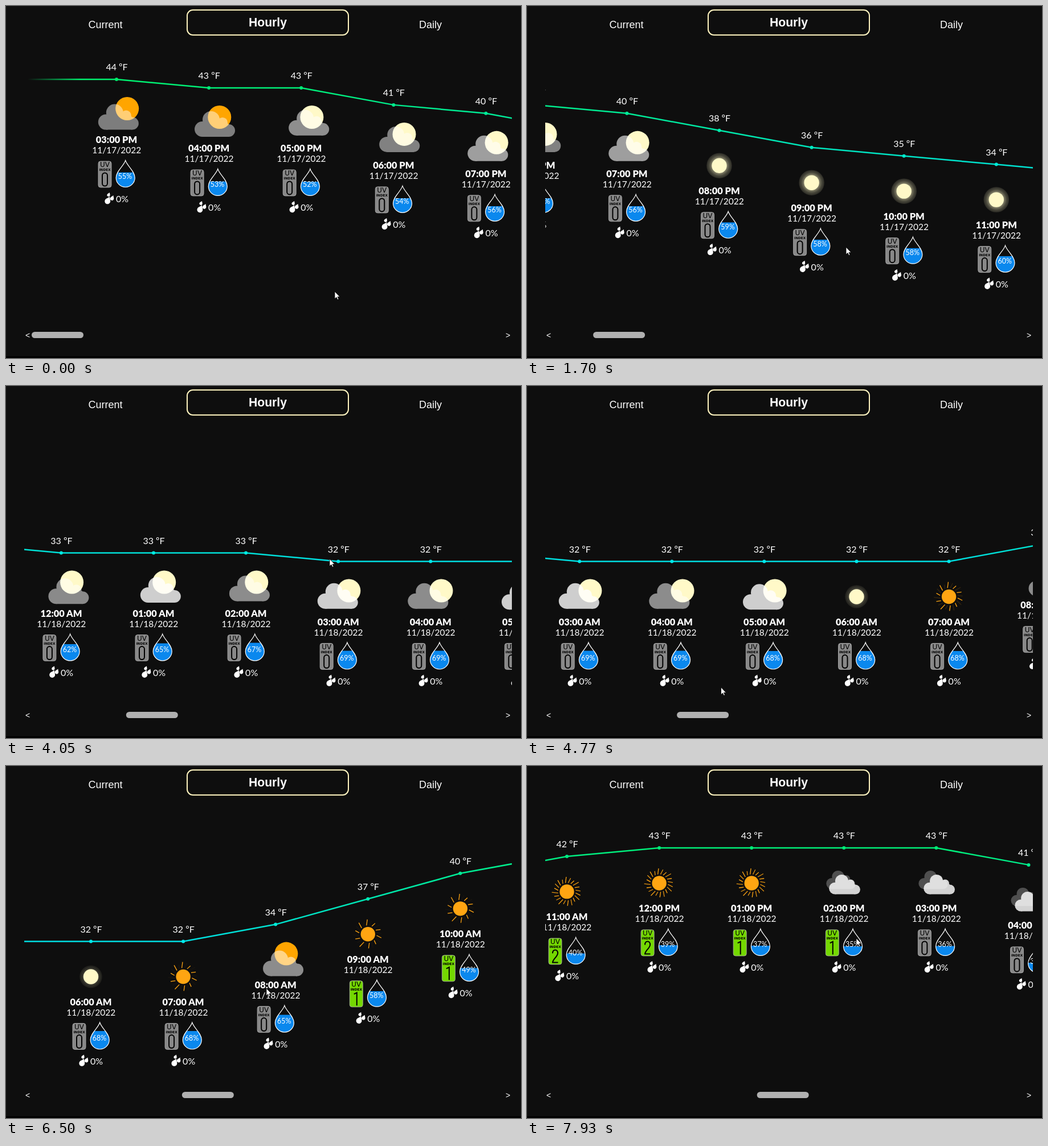
An HTML page that plays this animation: 904x619 px, repeating every 8 s.

```html
<!DOCTYPE html>
<html lang="en">
<head>
<meta charset="utf-8">
<title>Hourly forecast</title>
<style>
html, body { margin: 0; width: 100%; height: 100%; overflow: hidden; background: #0e0e0e; }
svg { display: block; width: 904px; height: 619px; }
text { fill: #fff; font: 16px Lato, sans-serif; text-anchor: middle; }
.tab { font: 18px "Liberation Sans", Arial, sans-serif; }
.tab.on { font-size: 21.2px; font-weight: bold; }
.arrow { font: 14px "Liberation Sans", Arial, sans-serif; }
.time { font-size: 16.4px; font-weight: 900; }
.date { font-size: 15.5px; }
.hum { font-size: 12.5px; }
.start { text-anchor: start; }
.uv { font: 12px "DejaVu Sans", sans-serif; fill: #000; }
.index { font: bold 5.8px "DejaVu Sans", sans-serif; fill: #000; }
.digit { fill: none; stroke: #000; stroke-width: 2; }
</style>
</head>
<body>
<svg viewBox="0 0 904 619">
  <defs>
    <clipPath id="panel"><rect x="32" y="90" width="856" height="480"/></clipPath>
    <linearGradient id="heat" gradientUnits="userSpaceOnUse" x1="0" y1="129" x2="0" y2="309">
      <stop stop-color="#00f06e"/><stop offset="1" stop-color="#00dee2"/>
    </linearGradient>
    <linearGradient id="lead" gradientUnits="userSpaceOnUse" x1="38" y1="0" x2="130" y2="0">
      <stop stop-color="#00f06e" stop-opacity="0"/><stop offset="1" stop-color="#00f06e"/>
    </linearGradient>
    <radialGradient id="glow">
      <stop offset=".55" stop-color="#fff9c8" stop-opacity=".55"/>
      <stop offset=".8" stop-color="#fff9c8" stop-opacity=".25"/>
      <stop offset="1" stop-color="#fff9c8" stop-opacity=".12"/>
    </radialGradient>
    <g id="cloud" fill="#fff">
      <circle cx="13.5" cy="31.5" r="13.5"/><circle cx="29" cy="15" r="15"/>
      <circle cx="49" cy="20" r="9"/><circle cx="60" cy="34" r="11"/>
      <path d="M13.5 45H60V23L49 15H29L18 22Z"/>
    </g>
    <path id="drop" d="M0 0C3 10 16.500 19 16.500 30.500A16.500 16.500 0 0 1-16.500 30.500C-16.500 19-3 10 0 0Z"/>
    <clipPath id="inDrop"><use href="#drop"/></clipPath>
    <g id="rain" fill="#fff">
      <use href="#drop" transform="translate(-12 -11) rotate(24) scale(.16)"/>
      <use href="#drop" transform="translate(-12 -4) rotate(24) scale(.3)"/>
      <use href="#drop" transform="translate(-5.500 -6) rotate(24) scale(.2)"/>
    </g>
  </defs>
  <rect width="904" height="619" fill="#0e0e0e"/>
  <rect y="616" width="904" height="3" fill="#000"/>
  <rect x="318" y="7" width="283" height="44" rx="10" fill="none" stroke="#fff5c0" stroke-width="2"/>
  <text class="tab" x="174.500" y="39">Current</text>
  <text class="tab on" x="459.500" y="36">Hourly</text>
  <text class="tab" x="745" y="39">Daily</text>
  <g clip-path="url(#panel)"><g id="strip"></g></g>
  <text class="arrow" x="38" y="584">&lt;</text>
  <text class="arrow" x="881" y="584">&gt;</text>
  <rect id="thumb" x="45" y="573" width="91" height="11" rx="5.500" fill="#b0b0b0"/>
  <path id="cursor" d="M0 0V13L3 10.200 5 14.500 7 13.600 5 9.400H9Z" fill="#fff" stroke="#000" stroke-width=".8"/>
</svg>
<script>
const $ = id => document.getElementById(id);
const LOOP = 8000, TICK = 130, HOURS = 26, GAP = 162.1;

// Turning points, joined by straight lines: hour and value
const tempTurns = [[0, 44], [2, 43.4], [6, 36.8], [9, 33.5], [16, 32.03], [19, 40.5], [21, 43.9], [24, 43], [25, 41]];
const humidTurns = [[0, 55], [2, 52], [5, 59], [7, 58], [12, 69.9], [16, 68], [17, 65.5], [18, 58], [20, 40.9], [23, 35.9], [25, 37]];

// Time and scroll distance; time and pointer position
const scrollTurns = [[0, 0], [520, 104], [780, 385], [1040, 385], [1690, 667], [2860, 667], [3120, 1001],
  [4030, 1556], [4680, 2047], [5200, 2047], [5590, 2352], [5850, 2150], [6500, 2476.5], [7930, 3366]];
const pointerTurns = [[0, 577, 502], [910, 560, 424], [1950, 560, 424], [2600, 568, 304], [4160, 568, 304],
  [4940, 295, 575], [5590, 326, 566], [6500, 457, 391], [7930, 578, 303]];

function sample(turns, t, c = 1) {
  const n = turns.findIndex(k => k[0] > t);
  if (n < 0) return turns[turns.length - 1][c];
  const a = turns[n - 1], b = turns[n];
  return a[c] + (b[c] - a[c]) * (t - a[0]) / (b[0] - a[0]);
}

const temp = i => Math.floor(sample(tempTurns, i));
const humidity = i => Math.floor(sample(humidTurns, i));
const uvIndex = h => Math.max(0, Math.round(2.2 - .6 * Math.abs(h - 11.5)));
const colX = i => 194 + GAP * i;
const lineY = i => 129 + 14.96 * (44 - temp(i));

const put = (g, html) => g.insertAdjacentHTML('beforeend', html);
const text = (cls, x, y, s) => `<text class="${cls}" x="${x}" y="${y}">${s}</text>`;
const disc = (x, y, r, fill) => `<circle cx="${x}" cy="${y}" r="${r}" fill="${fill}"/>`;
const cloud = (x, y, size, alpha) =>
  `<use href="#cloud" transform="translate(${x} ${y}) scale(${size})" opacity="${alpha}"/>`;

const digits = [
  '<rect x="-4.500" y="150" width="9" height="23" rx="4.500"/>',
  '<path d="M-4 153L1 150.500V173"/>',
  '<path d="M-4.500 156C-5 148 5 148 4.500 156C4 162-4 166-4.500 172H5"/>'
];

function rays(odd) {
  let d = '';
  for (let k = odd; k < 20; k += 2) {
    const a = k * Math.PI / 10 + .15, r = 24.5 + 2 * Math.sin(k * 2.3);
    const at = (q, b) => (q * Math.cos(b)).toFixed(1) + ' ' + (q * Math.sin(b)).toFixed(1);
    d += `M${at(15.5, a)}L${at(r, a + .12)}`;
  }
  return `<path class="${odd ? 'odd' : 'even'}" d="${d}" stroke="#ffa512" stroke-width="1.3"/>`;
}

function icon(i, h) {
  const day = h > 6 && h < 17;
  const x = -31 + 9 * Math.cos(.85 * (i - 2));
  if (i > 22) return cloud(-31, 40, .72, .27) + cloud(x, 47, .77, .82);
  if (i < 5 || h < 6 || h === 8) {
    const y = 42 - 4 * Math.cos(.66 * (i - 3));
    const grow = Math.min(1, i / 10);
    const alpha = .46 + grow * (i % 2 ? .06 : .34);
    return disc(18.7, 51.5, 20.5, day ? '#ffa500' : '#fff9c8') + cloud(x, y, 1, alpha);
  }
  if (!day) return '<circle class="halo" cy="62" r="22" fill="url(#glow)"/>' + disc(0, 62, 13.2, '#fff9c8');
  return `<g transform="translate(0 62)">${rays(0)}${rays(1)}${disc(0, 0, 12.7, '#ffa512')}</g>`;
}

function column(i) {
  const h = (15 + i) % 24, hour = String(h % 12 || 12).padStart(2, '0');
  const uv = uvIndex(h), level = 47 * (1 - humidity(i) / 100);
  return `<g transform="translate(${colX(i)} ${lineY(i)})">` +
    disc(0, 0, 3, `hsl(${147.500 + 33 * (44 - temp(i)) / 12} 100% 46%)`) +
    text('', .5, -16, temp(i) + ' ºF') + icon(i, h) +
    text('time', 0, 112, `${hour}:00 ${h < 12 ? 'AM' : 'PM'}`) +
    text('date', .3, 130, `11/${i < 9 ? 17 : 18}/2022`) +
    '<g transform="translate(-20.500 14)">' +
    `<rect x="-11.500" y="130" width="23" height="46" rx="4" fill="${uv ? '#74d800' : '#888'}" stroke="#b4b4b4" stroke-width=".8"/>` +
    text('uv', 0, 140, 'UV') + text('index', 0, 147, 'INDEX') +
    `<g class="digit" transform="translate(0 .5)">${digits[uv]}</g></g>` +
    '<g transform="translate(15.700 142.500)">' +
    `<rect x="-17" y="${level}" width="34" height="48" fill="#0a88ee" clip-path="url(#inDrop)"/>` +
    '<use href="#drop" fill="none" stroke="#fff" stroke-width="1.2"/></g>' +
    text('hum', 15, 174.5, humidity(i) + '%') +
    '<use href="#rain" transform="translate(0 210)"/>' +
    text('start', -1, 216, '0%') + '</g>';
}

const strip = $('strip');
const hours = Array.from({ length: HOURS }, (_, i) => i);
const line = hours.map(i => `${colX(i)},${lineY(i)}`).join(' ');
put(strip, '<path d="M38 128.900H194V129.100H38Z" fill="none" stroke="url(#lead)" stroke-width="2.300"/>' +
  `<polyline points="${line}" fill="none" stroke="url(#heat)" stroke-width="2.500"/>` +
  hours.map(column).join(''));

const halos = document.querySelectorAll('.halo');
const oddRays = document.querySelectorAll('.odd');
const wave = (t, period) => Math.cos(t / period * 2 * Math.PI);

function draw(now) {
  // The picture refreshes in steps, slightly ahead of the clock
  const t = Math.floor((now % LOOP + 40) / TICK) * TICK;
  const scroll = sample(scrollTurns, t);
  strip.setAttribute('transform', `translate(${-scroll} 0)`);
  $('thumb').setAttribute('x', 45 + scroll / 9.385);
  $('cursor').setAttribute('transform', `translate(${sample(pointerTurns, t)} ${sample(pointerTurns, t, 2)})`);
  const pulse = wave(t - 2000, LOOP);
  halos.forEach(el => {
    el.setAttribute('r', 21 + 1.3 * pulse);
    el.setAttribute('opacity', .75 + .25 * pulse);
  });
  oddRays.forEach(el => el.setAttribute('opacity', .5 + .5 * wave(t - 5590, 2100)));
  requestAnimationFrame(() => draw(performance.now()));
}
draw(0);
</script>
</body>
</html>
```
